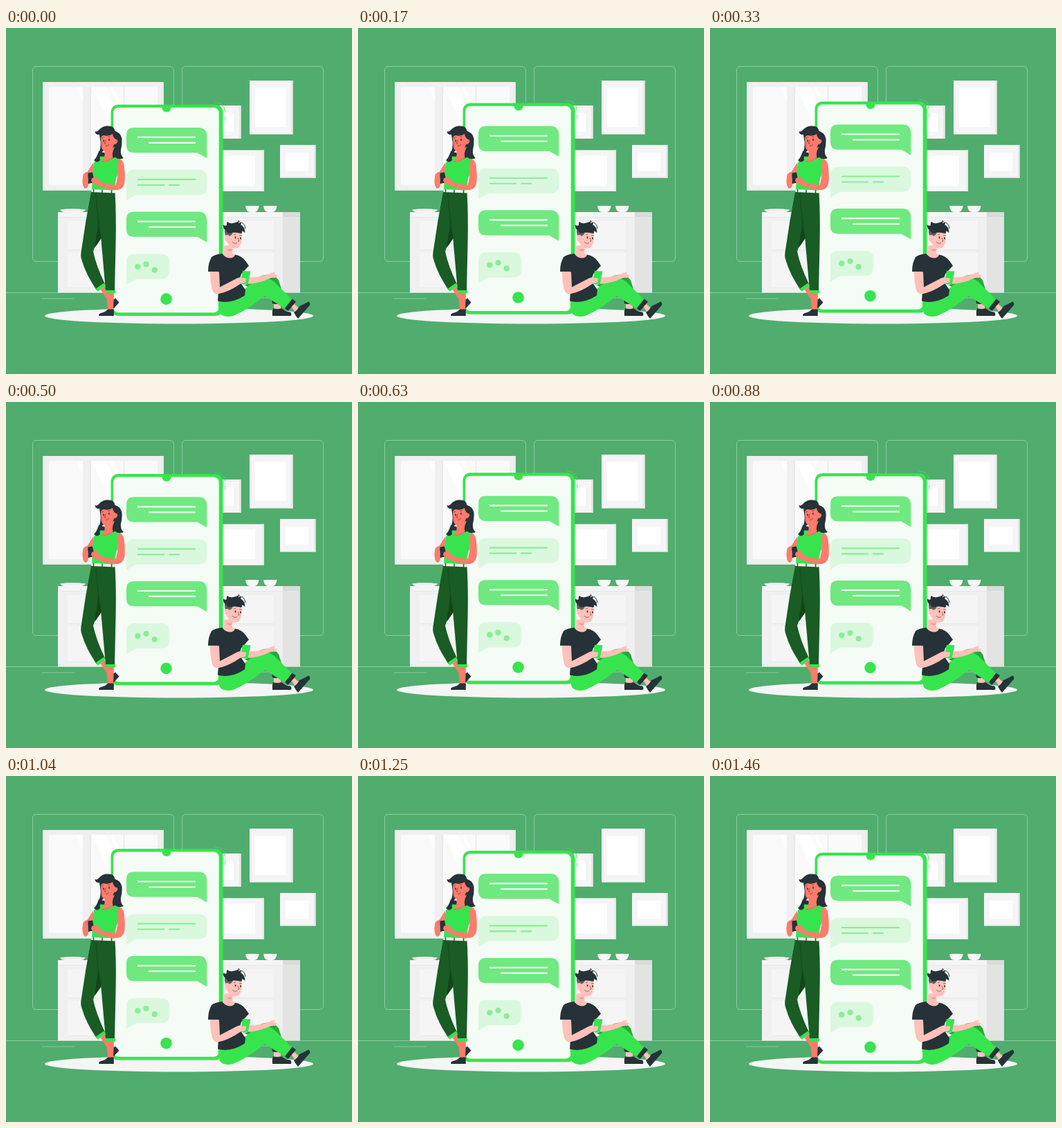
An HTML page for the animation above (1.5 s loop, 500x500 px).

```html
<!DOCTYPE html>
<html lang="en">
<head>
<meta charset="utf-8">
<title>Chatting</title>
<style>
  html, body { margin: 0; width: 100%; height: 100%; overflow: hidden; background: #50ad6e; }
  svg { display: block; width: 100%; height: 100%; }
  .line { fill: none; stroke: #9ed2ae; stroke-width: .8; }
  .lime { fill: #37e44e; }
  .dark { fill: #263238; }
  .coral { fill: #ff7b6b; }
  .pink { fill: #ffc1b9; }
  .pants { fill: #195c24; }
  .strong { fill: #6fe980; }
  .soft { fill: #daf8de; }
  .white { stroke: #effcf0; }
  .mint { stroke: #8bed98; fill: none; }
  .text { stroke-width: 2.2; }
</style>
</head>
<body>
<svg viewBox="0 0 500 500">
  <rect width="500" height="500" fill="#50ad6e"/>

  <g class="line">
    <rect x="38.5" y="55.5" width="204" height="282" rx="5"/>
    <rect x="254.5" y="55.5" width="204" height="282" rx="5"/>
    <path d="M0 382.5H500M52 391H99M367 390H384"/>
  </g>

  <!-- window -->
  <rect x="53" y="78" width="175" height="157" fill="#f0f0f0"/>
  <path d="M53 78h2v157h-2zM226 78h2v157h-2zM53 233.500h175v1.500H53z" fill="#e5e5e5"/>
  <path d="M62 85h49v142H62zM123 85h47v142h-47zM171 85h48v142h-48z" fill="#fafafa"/>
  <path d="M122 85v142M170.500 85v142" stroke="#e3e3e3"/>
  <path d="M101 85h10v20zM123 85h22l28 66v30zM149 85h6l15 34v14z" fill="#fff"/>

  <g id="pictures"></g>

  <!-- sideboard -->
  <rect x="75" y="266" width="325" height="116.500" fill="#f0f0f0"/>
  <rect x="400" y="266" width="25" height="116.500" fill="#e3e3e3"/>
  <path d="M75 266h325v7H75z" fill="#f4f4f4"/>
  <path d="M400 266h25v7h-25z" fill="#dadada"/>
  <path d="M75 273.500h350" stroke="#e6e6e6"/>
  <path d="M89 279h299v41H89zM89 324.500h299V375H89z" fill="#f5f5f5"/>
  <path d="M89 320.500h299M89 375.500h299M388 279v96" stroke="#e9e9e9" fill="none"/>
  <path d="M346 257h19.500q-1 9-7 9h-5.500q-6 0-7-9zM372 257h19.500q-1 9-7 9H379q-6 0-7-9z" fill="#f7f7f7"/>
  <path d="M78 262.500q18-2.500 37 0-2 3.500-8 3.500H86q-6 0-8-3.500z" fill="#f7f7f7"/>
  <path d="M79 263q18 2 35 0" stroke="#dedede" fill="none" stroke-width=".7"/>

  <ellipse cx="250" cy="416" rx="194" ry="11.500" fill="#f5f5f5"/>

  <!-- big phone, drawn at its lowest position -->
  <g id="phone">
    <path d="M301.500 108Q316 108 316.500 122M316.500 128v6.500" stroke="#37e44e" stroke-width=".8" fill="none"/>
    <rect class="lime" x="151.500" y="111" width="162" height="305.300" rx="10.500"/>
    <rect x="155" y="115.300" width="152.700" height="296.200" rx="7.500" fill="#f4fcf5"/>
    <path class="lime" d="M223.500 114.500h2q0 7.200 6.500 7.200t6.500-7.200h2z"/>
    <circle class="lime" cx="231.500" cy="392" r="8.300"/>
    <g id="chat"></g>
  </g>

  <!-- standing woman -->
  <g>
    <path class="coral" d="M136.500 378l6-5 5 9 9 10-4 8-8-10z"/>
    <path class="dark" d="M155 393l3-2.500 5.500 6-7.500 8.500-3-1z"/>
    <path class="coral" d="M145 383h11l-1 24h-8z"/>
    <path class="dark" d="M147 406.500h8.800v9.500H134.500q-1.500-2.500 2.500-4 7-1.500 10-5.500z"/>
    <path class="pants" d="M123 237l25 1-11 52-11 33q4 20 17 47l-12 9q-16-24-21-42-3-7-1-16 6-43 14-84z"/>
    <path d="M135 272l-7 46 14-20z" fill="#124519"/>
    <path class="pants" d="M130 237l27.500 1q2 32 1 74l-1.500 68h-13l-7-79q-6-31-7-64z"/>
    <path d="M130 240q2 34 7 61" fill="none" stroke="#124519" stroke-width=".7"/>
    <path class="lime" d="M130 376.500l11.500-8 2 4-11 8.500zM143 379h15v4.500h-14.500z"/>
    <path d="M123.500 233.500l33.500 1v4l-33.500-1.500z" fill="#f5f5f5"/>
    <path d="M126.500 233v5M139 233.500v5M152.500 234v5" stroke="#195c24" stroke-width="1.500"/>
    <path class="dark" d="M134 178q-3 10-7 13 5 5 12 4 8-4 9-13z"/>
    <path class="coral" d="M126.500 194q-8 12-11 18-6 4-5 9 0 9 4 11 4 0 5-8l6-12z"/>
    <path class="lime" d="M131 188q-5 5-5.500 17l-1.500 28 33 1.500 2-17q6-9 6-28l-8-3-20-1z"/>
    <path class="coral" d="M141 171l16-2-.5 18q-7 8-19 6 6-5 5-13z"/>
    <path class="coral" d="M164 189q5 2 6.500 9 2 13 1 25-2 10-10 11-14 1-33-8l-5-7 3-4 7 3 6 6 19 3q4-13 3-24-.5-10 2.500-14z"/>
    <path class="dark" d="M117 210l8-1.500 3 14.500-9 2z"/>
    <path class="coral" d="M111 213q3-5 7-5l1 12-2 6-6 1zM124 217l6-2 6 6-3 6-7-2-3-4z"/>
    <path class="dark" d="M135 154q-6 1-6.500-5 3 2 6-2 7-7 17-5 5 1 6 7 8 2 10 11 .5 9-1.500 16-1 8 4 12-7 3-12-1-2-1-3 2-3-8 2-17l-16 5q-7 5-5 14-5 5-8 0 6-6 7-13 3-9 1-17z"/>
    <path class="coral" d="M137 160q0-4 4-5 8 2 13-2 1 6 5 8 3 0 2 4-2 4-5 3-1 7-7 9-8 3-11-4z"/>
    <path d="M141 162v2M149 160.500v2" stroke="#263238" stroke-width="1.400" stroke-linecap="round"/>
    <path d="M138 159.500l3-1.500M147 157l3 .5M144 162l-1.500 5 2 .5M144 170.500q3 .5 5-2.500" fill="none" stroke="#8c302c" stroke-width=".8"/>
    <path d="M138 193q10 0 16-6" fill="none" stroke="#27b93a" stroke-width=".7"/>
  </g>

  <!-- sitting man -->
  <g>
    <path class="dark" d="M384 393l8 1 1 6-8-2z"/>
    <path class="pink" d="M387 399h10v8h-10z"/>
    <path class="dark" d="M386 405q6 2 12 0 6 5 13 5.500 2 2 1 5.500H385q-1-6 1-11z"/>
    <path d="M345 372q18-14 32-15.500 12 0 17 8l5 16-18 6z" fill="#27a93a"/>
    <path class="pink" d="M412 402l5-3 6 6-5 6z"/>
    <path class="dark" d="M416 411q6-4 8-9 7-3 13-6.500 3 1 2 5L422 420q-3-3-6-9z"/>
    <path class="lime" d="M307 394q18-1 38-17 15-13 27-15 10-1 17 6l25 25-9 14-31-20q-25 21-46 29-14 3-19-4-3-9-2-18z"/>
    <path class="dark" d="M413.500 391.500l5.500 4-11.500 13.500-4.500-4z"/>
    <path class="pink" d="M346 360q20 1 33-4 7-4 10-3l-2 3 5 1-3 4q-4-1-8 1-19 8-34 8z"/>
    <path class="pink" d="M315 315l13-2-1 12 4 3q-2 6-9 5-6-1-9-6 3-4 2-12z"/>
    <path class="dark" d="M312.500 326q4 6 11 6.500 6 0 7.500-5 10 2 15 9l5 7-11 12-3 10 9 13-1 8q-20 13-39 8l2-28-1-14-15-.5q0-12 5-21 5-4 15.500-5z"/>
    <path class="pink" d="M295 352l13 .5 1 22 25-13 6-2 8 1-1 6-8 3q-17 12-33 15-6 0-8-6-3-12-3-26.500z"/>
    <path class="lime" d="M342 351l11.500.5-4 19.500-11-1z"/>
    <path class="pink" d="M337 361l9 .5q3 2 0 3l1 2-3 2-8 1z"/>
    <path class="pink" d="M320 295l17-2q4 3 3.500 10 0 9-4 14-6 3-11 1l-9-12z"/>
    <path d="M317 289l12 2-2 7-4 3-6-1q-2-6 0-11z" fill="#596166"/>
    <path class="pink" d="M316 300q6-3 8 3l-2 5q-5 0-6-8z"/>
    <path class="dark" d="M317 292q-4-3-3-8 2 3 5 1-1-3 1-5 3 3 8 2 5-1 9-3l-1 3 5-1-2 3q6 3 6.500 12l-4-3-1 4q-11-3-19 0z"/>
    <path d="M341 281q5 4 5 9M336 278l3 4" stroke="#263238" stroke-width="1" fill="none"/>
    <path d="M331.500 302v1.500M339 303v1.500" stroke="#263238" stroke-width="1.700" stroke-linecap="round"/>
    <path d="M329 299l3-1M337 300l4-.5M335 303l2 5-2 .5M327 309q4 4 7 1" fill="none" stroke="#8f4b45" stroke-width=".8"/>
    <path d="M317 318q4 4 9 1l-.5 3q-4 1-8.500-4z" fill="#e8988e"/>
  </g>
</svg>

<script>
const $ = id => document.getElementById(id);

function picture(x, y, w, h, left, top, right, bottom) {
  const box = (x, y, w, h, fill) =>
    `<rect x="${x}" y="${y}" width="${w}" height="${h}" fill="${fill}"/>`;
  return box(x, y, w, h, '#f5f5f5') +
    box(x + w - 2.5, y, 2.5, h, '#e8e8e8') +
    box(x, y + h - 1, w, 1, '#e8e8e8') +
    box(x + left, y + top, w - left - right, h - top - bottom, '#fff');
}

$('pictures').innerHTML =
  picture(352, 76, 62.5, 77.5, 8, 10.5, 10, 10.5) +
  picture(285, 112, 54.5, 48, 9, 11, 10.5, 10) +
  picture(300, 176.5, 73, 59.5, 10, 8, 13, 8.5) +
  picture(396, 169, 51.5, 47.5, 8, 11, 10.5, 10);

const sent = y => `<path class="strong" d="M185 ${y}H278Q290.300 ${y} 290.300 ${y + 13}
  V${y + 44.3}L276.500 ${y + 36.3}H185Q174 ${y + 36.3} 174 ${y + 25}V${y + 11}Q174 ${y} 185 ${y}Z"/>
  <path class="white text" d="M190 ${y + 14}H274M206 ${y + 22}H274"/>`;

const received = (y, right) => `<path class="soft" d="M186 ${y}H${right - 12}
  Q${right} ${y} ${right} ${y + 12}V${y + 24.3}Q${right} ${y + 36.3} ${right - 12} ${y + 36.3}
  H188L174 ${y + 44.5}V${y + 12}Q174 ${y} 186 ${y}Z"/>`;

const dot = (x, y) => `<circle cx="${x}" cy="${y}" r="4.100" fill="#8bed98"/>`;

$('chat').innerHTML =
  sent(144.3) +
  received(205.2, 290.3) +
  '<path class="mint text" d="M190 219.300H274M190 227.300H229M235 227.300H251"/>' +
  sent(265.9) +
  received(326.8, 236) +
  dot(190.3, 345.1) + dot(202.5, 341.8) + dot(214.7, 350);

// Linear rise and fall, sampled at 24 steps per second.
const LOOP = 1500, STEP = 1000 / 24, RISE = 10, LEAD = 25;

function draw(now) {
  const t = Math.floor((now % LOOP + 3.4) / STEP) * STEP;
  const phase = (t + LEAD) % LOOP / LOOP;
  const lift = RISE * (1 - Math.abs(2 * phase - 1));
  $('phone').setAttribute('transform', `translate(0 ${-lift.toFixed(3)})`);
}

const start = performance.now();
function tick() {
  draw(performance.now() - start);
  requestAnimationFrame(tick);
}
tick();
</script>
</body>
</html>
```
